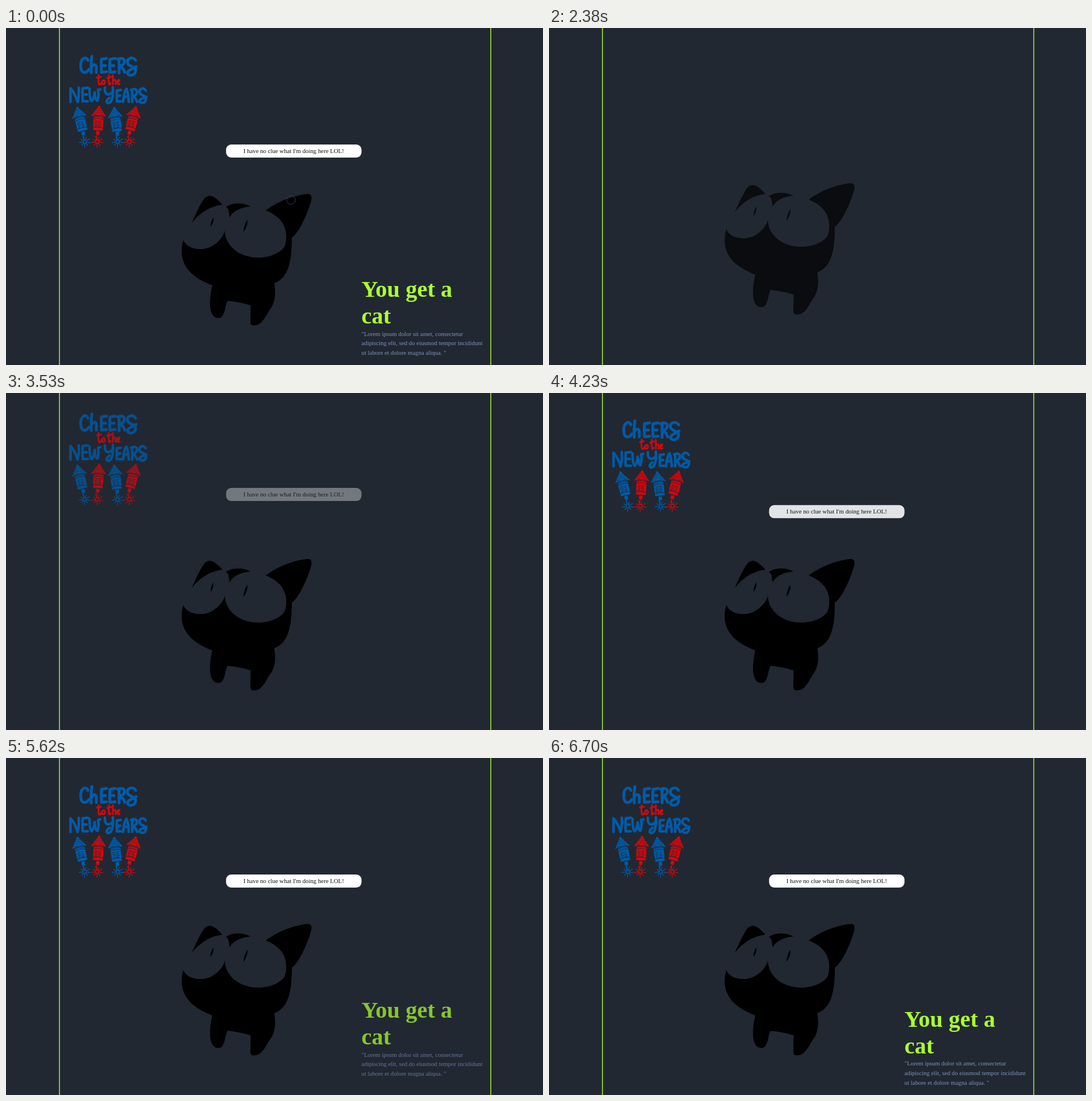
Animation of 945x593 px, one loop 8000 ms. Source, as an HTML page:

```html
<!DOCTYPE html>
<html lang="en">
<head>
<meta charset="utf-8">
<title>You get a cat</title>
<style>
  html, body { margin: 0; width: 100%; height: 100%; overflow: hidden; background: #212832; }
  svg { display: block; width: 100%; height: 100%; }
  text { font-family: "Liberation Serif", "Times New Roman", serif; font-size: 10.8px; }
  .ink { fill: none; stroke-linecap: round; stroke-linejoin: round; }
  .cut { fill: none; stroke: #212832; }
  .blue { color: #005ba9; }
  .red { color: #d3080f; }
</style>
</head>
<body>
<svg viewBox="0 0 945 593">
  <defs>
    <g id="rocket">
      <path fill="currentColor" d="M0 0L13.5 20Q0 14-13.5 20ZM-9 20Q0 16 9 20L8.5 44H-8.5ZM-3 45.5H3V52H-3Z"/>
      <g class="cut">
        <path stroke-width="1.3" stroke-dasharray="1.3 1.8" d="M-3 6H4M-5 9.5H6M-7 13H8M-9 16H-3M4 16H9"/>
        <path stroke-width="1" d="M-9 21.5Q0 17.5 9 21.5M-9 25Q0 21 9 25M-9 40Q0 37 9 40"/>
        <path stroke-width="1" stroke-dasharray="5 1.5" d="M-6 28H7M-7 31H6M-6 34H7M-7 37H6"/>
      </g>
    </g>
    <g id="spark" class="ink" stroke="currentColor">
      <circle r="3" stroke-width="1.5"/>
      <path id="rays" stroke-width="1.3"/>
    </g>
  </defs>

  <path stroke="#91d435" stroke-width="1.8" d="M94.1 0V593M853.1 0V593"/>

  <g id="logo">
    <g class="ink blue" stroke="currentColor" stroke-width="5">
      <path d="M144 57C142 49 131 52 131.5 67C132 82 141 80 146 73
        M151 50Q149 64 150 79M150 70C153 62 159 63 159 70V78
        M177 53.5L168 55Q167 67 168 78L177 77M168 66H175
        M192 53.5L183 55Q182 67 183 78L192 77M183 66H190"/>
      <path d="M199 57V79M196 55C210 49 213 63 201 67Q206 70 209 78
        M228 57C224 49 211 53 214 62C217 69 229 67 228 76C227 85 214 85 214 79C214 74 222 73 229 68"/>
      <path stroke-width="4.5" d="M113.5 130V106Q121 114 126 130Q129 118 128 105
        M144 105L135 106Q134 118 135 129L144 129M135 117H142
        M147 107Q147 127 151 129Q155 124 156 113Q157 128 161 128Q164 120 162 109L166 108"/>
      <path stroke-width="4.5" d="M174 105C173 118 181 120 188 112M188 104C189 118 187 133 179 132Q174 129 182 123
        M202 109L195 110V129L202 129M195 119H201
        M206 130Q208 111 212 107Q215 113 216 130M207 121H215"/>
      <path stroke-width="4.5" d="M222 110V130M220 109C232 103 234 117 224 120Q228 123 231 130
        M246 110C242 103 233 107 235 114C238 120 248 118 246 127C244 134 234 132 235 128Q237 124 247 121"/>
    </g>
    <path class="ink red" stroke="currentColor" stroke-width="3.1" d="M163 83Q162 99 164 99.500Q167 100 168 96M160 87L167 86
      M172 92C168 93 168 99 171 99C175 99 175 92 172 92
      M181 83Q180 99 182 99.500Q184 99 184 97M178 88L185 86
      M188 83V99M188 94Q192 88 193 94V99
      M196 96Q201 93 199 91Q196 91 196 96Q197 101 200 98"/>
    <g id="rockets"></g>
  </g>

  <g id="bubble">
    <rect x="387.300" y="205" width="238.300" height="23" rx="9" fill="#fff"/>
    <text x="506.300" y="220" text-anchor="middle" fill="#111">I have no clue what I'm doing here LOL!</text>
  </g>

  <g id="cat">
    <path d="M327 343C334 327 343 307 350 299C358 292 366 294 381 311C360 313 341 325 327 343Z"/>
    <path d="M387 315C397 307 418 307 430 314C412 316 399 322 394 333C391 326 394 319 387 315Z"/>
    <path d="M457 321C480 304 505 295 530 292C537 291 539 297 537 304C533 320 518 358 503 369
      C503 405 499 440 472 449C475 465 474 480 467 492C460 500 453 521 440 523C432 524 430 523 430 516
      L430.500 488Q411 482 390 480C385 487 386 508 376 510C364 512 359 500 359 485Q359 469 363 453
      C340 444 309 428 309 392Q309 382 312 373C318 388 340 393 358 386C372 380 384 366 385 356
      C386 385 412 404 444 404C462 404 482 397 490 385C494 376 494 362 491 353C487 338 474 328 457 321Z"/>
    <path d="M365 333Q366 342 360 350Q359 343 365 333ZM425 337Q426 347 418 359Q418 348 425 337Z"/>
  </g>

  <g id="message">
    <g fill="#adff2f" font-weight="bold">
      <text x="625.500" y="473" style="font-size:40.500px">You get a</text>
      <text x="625.500" y="520" style="font-size:40.500px">cat</text>
    </g>
    <g fill="#8093b8">
      <text x="625.500" y="541.500">"Lorem ipsum dolor sit amet, consectetur</text>
      <text x="625.500" y="558.200">adipiscing elit, sed do eiusmod tempor incididunt</text>
      <text x="625.500" y="574.800">ut labore et dolore magna aliqua. "</text>
    </g>
  </g>

  <circle id="pointer" r="7.700" stroke-width="1"/>
</svg>
<script>
const LOOP = 8000, RELOAD = 1500, DURATION = 2000, DROP = 60;
const starts = { cat: 1579, logo: 2562, bubble: 3068, message: 4742 };
const byId = id => document.getElementById(id);

byId('rays').setAttribute('d', Array.from({ length: 9 }, (_, i) => {
  const a = i * Math.PI * 2 / 9 + 0.2, reach = i % 2 ? 8 : 10;
  const point = r => `${r * Math.cos(a)} ${r * Math.sin(a)}`;
  return `M${point(4.5)}L${point(reach)}`;
}).join(''));

// colour, apex x, apex y, tilt, spark x
byId('rockets').innerHTML = [
  ['blue', 125, 138, -13, 138.5],
  ['red', 164, 136, 3, 160.5],
  ['blue', 190, 138, -7, 196.5],
  ['red', 229, 137, 14, 217]
].map(([color, x, y, tilt, sparkX]) => `<g class="${color}">
  <use href="#rocket" transform="translate(${x} ${y}) rotate(${tilt})"/>
  <use href="#spark" transform="translate(${sparkX} 200)"/>
  <path class="ink" stroke="currentColor" stroke-width="1.500"
    d="M${x - 52 * Math.sin(tilt * Math.PI / 180)} 189Q${sparkX - 3} 192 ${sparkX} 197"/></g>`).join('');

// cubic-bezier(.25, .1, .25, 1)
function ease(x) {
  if (x <= 0) return 0;
  if (x >= 1) return 1;
  let low = 0, high = 1, s;
  for (let i = 0; i < 24; i++) {
    s = (low + high) / 2;
    if (0.75 * s * (1 - s) + s ** 3 < x) low = s; else high = s;
  }
  return 0.3 * s * (1 - s) ** 2 + 3 * s * s * (1 - s) + s ** 3;
}

function showPointer(t) {
  const hover = t < 70, press = t >= 1370 && t < RELOAD;
  const pointer = byId('pointer');
  pointer.setAttribute('visibility', hover || press ? 'visible' : 'hidden');
  pointer.setAttribute('transform', hover ? 'translate(501.5 302.5)' : 'translate(400.5 69)');
  pointer.setAttribute('fill', hover ? 'none' : '#14171e');
  pointer.setAttribute('stroke', hover ? '#393e45' : '#484a4e');
}

function draw(now) {
  const t = now % LOOP;
  for (const [id, start] of Object.entries(starts)) {
    const shown = t < RELOAD ? 1 : ease((t - start) / DURATION);
    const part = byId(id);
    part.setAttribute('opacity', shown);
    part.setAttribute('transform', `translate(0 ${DROP * (shown - 1)})`);
  }
  showPointer(t);
}

const origin = performance.now();
function tick() {
  draw(performance.now() - origin);
  requestAnimationFrame(tick);
}
tick();
</script>
</body>
</html>
```
